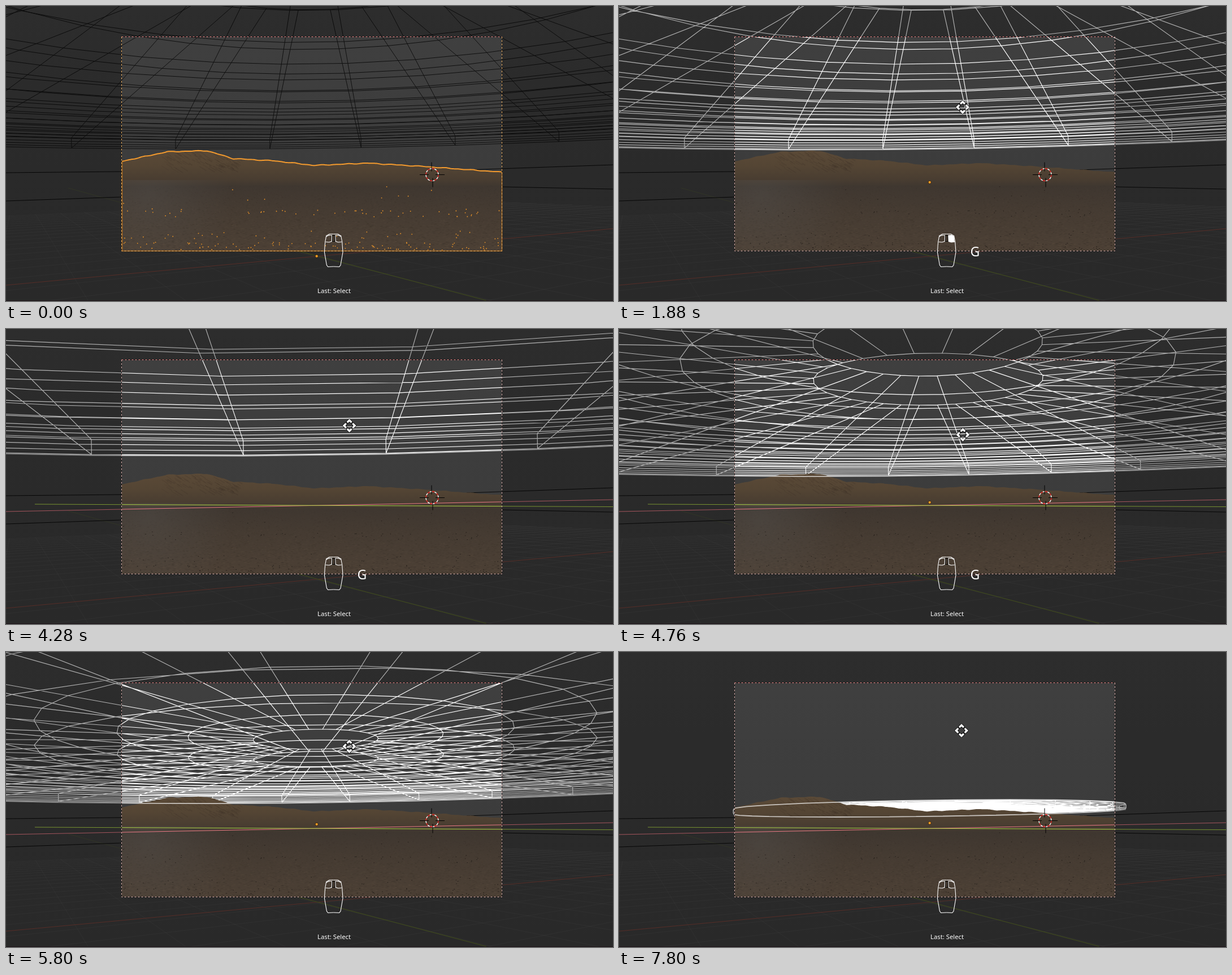
An HTML page with a canvas that plays this animation: 1074 px wide and 522 px high, repeating every 8000 ms.

```html
<!DOCTYPE html>
<html>
<head>
<meta charset="utf-8">
<style>
html, body { margin: 0; width: 100%; height: 100%; overflow: hidden; background: #2b2b2b; }
canvas { display: block; }
</style>
</head>
<body>
<canvas id="stage" width="1074" height="522"></canvas>
<script>
const W = 1074, H = 522, LOOP = 8000;
const LEFT = 204, TOP = 54, RIGHT = 878, BOTTOM = 433;
const FOCAL = 936, CX = 550, HORIZON = 305, ROLL = 0.0134;
// The disc: 32 spokes, 16 rings, two layers; one rim segment is one unit long.
const SPOKES = 32, RINGS = 16, RADIUS = 5.101, LOW = 0.331, HIGH = 0.431, YAW = 0.002;
const ORANGE = '#f39a2e', FONT = '"Noto Sans", "Open Sans", sans-serif';

const ctx = document.getElementById('stage').getContext('2d');

let seed = 7;
const rand = () => (seed = (seed * 16807) % 2147483647) / 2147483647;
const between = (a, b) => a + (b - a) * rand();
const lerp = (a, b, k) => a + (b - a) * k;

function layer(draw) {
  const c = document.createElement('canvas');
  c.width = W; c.height = H;
  draw(c.getContext('2d'));
  return c;
}

function trace(g, pts) {
  g.beginPath();
  pts.forEach(p => g.lineTo(p[0], p[1]));
}

function line(g, color, width, ...pts) {
  g.strokeStyle = color;
  g.lineWidth = width;
  trace(g, pts);
  g.stroke();
}

// x to the right, z away from the camera, up above the eye
function project([x, z], up) {
  const sx = FOCAL * x / z, sy = FOCAL * up / z;
  return [CX + sx - ROLL * sy, HORIZON - sy - ROLL * sx];
}

function edge(g, a, b, upA, upB = upA, shift = 0) {
  const near = 0.08;
  if (a[1] < near && b[1] < near) return;
  const cut = (p, q) => p[1] >= near ? p
    : [lerp(p[0], q[0], (near - p[1]) / (q[1] - p[1])), near];
  const p = project(cut(a, b), upA), q = project(cut(b, a), upB);
  g.moveTo(p[0], p[1] + shift);
  g.lineTo(q[0], q[1] + shift);
}

/* ---------- still layers ---------- */

const backdrop = layer(g => {
  const sky = g.createLinearGradient(0, 0, 0, H);
  sky.addColorStop(0, '#404040');
  sky.addColorStop(0.55, '#3c3c3c');
  sky.addColorStop(1, '#3b3b3b');
  g.fillStyle = sky;
  g.fillRect(0, 0, W, H);

  // floor grid turned by about 32 degrees
  const at = (a, b) => [0.848 * a - 0.494 * b, 6.7 + 0.53 * a + 0.869 * b];
  g.beginPath();
  for (let i = -12.6; i <= 12.6; i += 0.7) {
    edge(g, at(i, -13), at(i, 13), -1);
    edge(g, at(-13, i), at(13, i), -1);
  }
  g.strokeStyle = 'rgba(255,255,255,.045)';
  g.stroke();

  line(g, '#7a4038', 1, [0, 494], [W, 394]);
  line(g, '#5b6b28', 1.2, [515, 433], [850, 521]);
  line(g, 'rgba(90,105,45,.35)', 1, [110, 322], [LEFT, 348]);
  line(g, '#080808', 1, [0, 295], [LEFT, 293]);
  line(g, '#080808', 1, [0, 345], [LEFT, 338]);
  line(g, '#080808', 1, [815, 290], [W, 281]);
  line(g, '#080808', 1, [RIGHT, 320], [W, 324]);
});

const peaks = [[LEFT, 275], [285, 258], [355, 256], [402, 270], [475, 274],
  [545, 282], [640, 278], [740, 284], [RIGHT, 294]];

function ridgeAt(x) {
  const i = Math.max(1, peaks.findIndex(p => p[0] >= x)), [a, b] = [peaks[i - 1], peaks[i]];
  return lerp(a[1], b[1], (x - a[0]) / (b[0] - a[0])) + 0.7 * Math.sin(x / 5) * Math.sin(x / 17);
}
const ridge = [];
for (let x = LEFT; x <= RIGHT; x += 2) ridge.push([x, ridgeAt(x)]);

const stones = [];
function scatter(n, y0, y1) {
  while (n--) stones.push([between(208, 875), between(y0, y1)]);
}
scatter(9, 318, 352);
scatter(48, 359, 374);
scatter(30, 398, 412);
scatter(90, 418, 432);

const terrain = layer(g => {
  trace(g, [...ridge, [RIGHT, BOTTOM], [LEFT, BOTTOM]]);
  g.clip();
  const soil = g.createLinearGradient(0, 255, 0, BOTTOM);
  [[0, '#5b4a37'], [0.16, '#544534'], [0.29, '#493d31'], [0.36, '#3f3730'],
   [0.6, '#453b32'], [1, '#4c4035']].forEach(s => soil.addColorStop(...s));
  g.fillStyle = soil;
  g.fillRect(LEFT, 250, RIGHT - LEFT, BOTTOM - 250);

  const haze = g.createRadialGradient(250, 335, 5, 250, 335, 150);
  haze.addColorStop(0, 'rgba(88,86,84,.35)');
  haze.addColorStop(1, 'rgba(88,86,84,0)');
  g.fillStyle = haze;
  g.fillRect(LEFT, 308, 300, BOTTOM - 308);

  // gullies on the slope
  for (let i = 0; i < 110; i++) {
    const x = between(275, 410), y = between(258, 288), l = between(4, 14);
    line(g, 'rgba(30,25,20,.1)', between(0.7, 2), [x, y], [x + l, y + l * 0.6]);
  }
  // ripples in the sand
  for (let i = 0; i < 5000; i++) {
    const k = rand(), x = between(LEFT, RIGHT), y = lerp(318, BOTTOM, k);
    const tone = rand() < 0.5 ? '20,16,12' : '130,110,92';
    line(g, `rgba(${tone},${0.04 + 0.06 * k})`, 1, [x, y], [x + 1.5 + 3 * k, y + between(-1, 1)]);
  }
  g.fillStyle = '#211c18';
  for (const [x, y] of stones) g.fillRect(x - 0.7, y - 0.5, 1.4, 1);
});

/* ---------- motion ---------- */

// first and last step, then the disc's depth and the pointer's height at the last step
const drags = [
  [3280, 3640, -3.52, 159],
  [4040, 4760, 1.5, 187],
  [4920, 5400, 1.28, 179],
  [5560, 5640, 1.6, 174],
  [5800, 6280, 7.17, 139],
  [6400, 6680, 39, 139],
  [6920, 7160, 25, 139],
  [7560, 7800, 14.64, 139]
];

// share of a stepped move that is done: one step on each 120 ms
function stepped(t, first, last) {
  const n = Math.round((last - first) / 120) + 1;
  return Math.min(n, Math.floor((t - first) / 120) + 1) / n;
}

function pose(t) {
  let depth = 0.72, y = 179;
  for (const [first, last, toDepth, toY] of drags) {
    if (t < first) break;
    const k = stepped(t, first, last);
    depth = lerp(depth, toDepth, k);
    y = lerp(y, toY, k);
  }
  return [depth, y];
}

/* ---------- disc ---------- */

function onDisc(i, r, depth) {
  const a = (i + 0.5) / SPOKES * 2 * Math.PI - YAW;
  return [r * Math.sin(a), depth + r * Math.cos(a)];
}

function drawWire(depth, color, width) {
  ctx.beginPath();
  for (let i = 0; i < SPOKES; i++) {
    const rim = onDisc(i, RADIUS, depth), hub = onDisc(i, RADIUS / RINGS, depth);
    for (const up of [LOW, HIGH]) {
      edge(ctx, hub, rim, up);
      for (let n = 1; n <= RINGS; n++) {
        const r = RADIUS * n / RINGS;
        edge(ctx, onDisc(i, r, depth), onDisc(i + 1, r, depth), up);
      }
    }
    edge(ctx, rim, rim, LOW, HIGH);
  }
  ctx.strokeStyle = color;
  ctx.lineWidth = width;
  ctx.stroke();
}

// silhouette: lower rim beyond the tangent points, upper rim before them
function drawOutline(depth, color) {
  const tangent = depth - RADIUS * RADIUS / depth;
  const isFar = i => depth < RADIUS || onDisc(i + 0.5, RADIUS, depth)[1] > tangent;
  ctx.beginPath();
  for (let i = 0; i < SPOKES; i++) {
    const a = onDisc(i, RADIUS, depth), b = onDisc(i + 1, RADIUS, depth), far = isFar(i);
    edge(ctx, a, b, far ? LOW : HIGH, undefined, far ? 1.5 : -0.5);
    if (far !== isFar(i + 1)) edge(ctx, b, b, LOW, HIGH);
  }
  ctx.strokeStyle = color;
  ctx.lineWidth = 1.8;
  ctx.stroke();
}

/* ---------- overlays ---------- */

function drawFrame(selected) {
  const l = LEFT + 0.5, t = TOP + 0.5, r = RIGHT - 0.5, b = BOTTOM + 0.5;
  ctx.fillStyle = 'rgba(0,0,0,.3)';
  ctx.beginPath();
  ctx.rect(0, 0, W, H);
  ctx.rect(LEFT, TOP, RIGHT - LEFT, BOTTOM - TOP);
  ctx.fill('evenodd');
  line(ctx, '#111', 1, [l, t], [r, t], [r, b], [l, b], [l, t]);
  if (selected) line(ctx, '#a8691f', 1.4, [l + 1, 275], [l + 1, b], [r, b], [r, 294]);

  const side = selected ? '#f0b060' : '#d4aaa6';
  ctx.setLineDash([3, 3]);
  line(ctx, '#e88080', 1, [l, t], [r, t]);
  line(ctx, side, 1, [l, t], [l, b], [r, b]);
  line(ctx, side, 1, [r, t], [r, b]);
  ctx.setLineDash([]);
}

function dot(x, y, r, color) {
  ctx.fillStyle = color;
  ctx.beginPath();
  ctx.arc(x, y, r, 0, 7);
  ctx.fill();
}

function drawTarget(x, y) {
  ctx.lineWidth = 1.4;
  for (let i = 0; i < 16; i++) {
    ctx.strokeStyle = i % 2 ? '#fff' : '#f02525';
    ctx.beginPath();
    ctx.arc(x, y, 11, i * Math.PI / 8, (i + 1) * Math.PI / 8);
    ctx.stroke();
  }
  for (const s of [-1, 1]) {
    line(ctx, '#000', 1, [x + 6 * s, y], [x + 22 * s, y]);
    line(ctx, '#000', 1, [x + s, y + 6 * s], [x + s, y + 22 * s]);
  }
}

// one half, mirrored
function drawMouse(pressed) {
  const button = [[13, 4.5], [8.5, 2], [3, 2.5], [3.5, 13], [8, 14.5], [14, 14]];
  const body = [[0, 0], [7.5, 0], [13, 3], [15, 14], [16.3, 32], [12.3, 55], [10, 58], [0, 57.5]];
  for (const s of [-1, 1]) {
    ctx.save();
    ctx.translate(579.7, 403.5);
    ctx.scale(s, 1);
    line(ctx, '#fff', 1.1, ...body);
    line(ctx, '#fff', 1.1, ...button);
    if (pressed && s > 0) {
      ctx.fillStyle = '#fff';
      ctx.fill();
    }
    ctx.restore();
  }
  ctx.strokeRect(577.7, 406, 4, 10.5);
}

function drawMover(x, y) {
  ctx.fillStyle = '#fff';
  ctx.save();
  ctx.translate(x, y);
  for (let i = 0; i < 4; i++) {
    ctx.rotate(Math.PI / 2);
    const tip = [[0, -12], [5, -7], [3, -4.5], [0, -7], [-3, -4.5], [-5, -7], [0, -12]];
    line(ctx, '#000', 1.6, ...tip);
    ctx.fill();
  }
  ctx.restore();
}

function drawCross(x, y) {
  for (const [color, width, r] of [['#000', 3, 10], ['#fff', 1, 9]]) {
    line(ctx, color, width, [x - r, y], [x + r, y]);
    line(ctx, color, width, [x, y - r], [x, y + r]);
  }
}

function text(str, x, y, size) {
  ctx.font = `${size}px ${FONT}`;
  ctx.fillStyle = '#fff';
  ctx.fillText(str, x, y);
}

function render(t) {
  const picked = t >= 1120, moving = t >= 1880;
  const [depth, pointerY] = pose(t);

  ctx.drawImage(backdrop, 0, 0);
  drawWire(depth, moving ? '#fff' : picked ? ORANGE : '#101010', picked ? 1.15 : 1);
  ctx.drawImage(terrain, 0, 0);
  if (picked) drawOutline(depth, moving ? 'rgba(255,255,255,.68)' : ORANGE);
  else {
    for (const [x, y] of stones) dot(x, y, 0.95, '#e8952e');
    line(ctx, ORANGE, 2, ...ridge);
  }
  if (t >= 2640) {
    line(ctx, '#e87884', 1.1, [0, 323], [W, 302]);
    line(ctx, '#a9cf45', 1.1, [51, 310], [W, 314.5]);
  }
  drawFrame(!picked);
  drawTarget(754, 298.5);

  if (depth > 0) {
    const y = picked ? 302.2 + 7 / depth : 442.7;
    dot(549.7, y, 2.7, '#3a2408');
    dot(549.7, y, 2.1, '#ffa028');
  }
  drawMouse(picked && t < 3280);
  if (moving && t < 4920) text('G', 621.5, 442.5, 23);
  text('Last: Select', 551, 508, 11.3);

  if (moving) drawMover(lerp(606, 608, (pointerY - 139) / 40), pointerY);
  else if (t >= 400) {
    const k = stepped(t, 400, 880);
    drawCross(lerp(663, 600, k), lerp(303, 170, k));
  }
  ctx.fillStyle = '#1c1216';
  ctx.fillRect(0, 521, W, 1);
}

const begin = performance.now();
function tick() {
  render((performance.now() - begin) % LOOP);
  requestAnimationFrame(tick);
}
tick();
</script>
</body>
</html>
```
